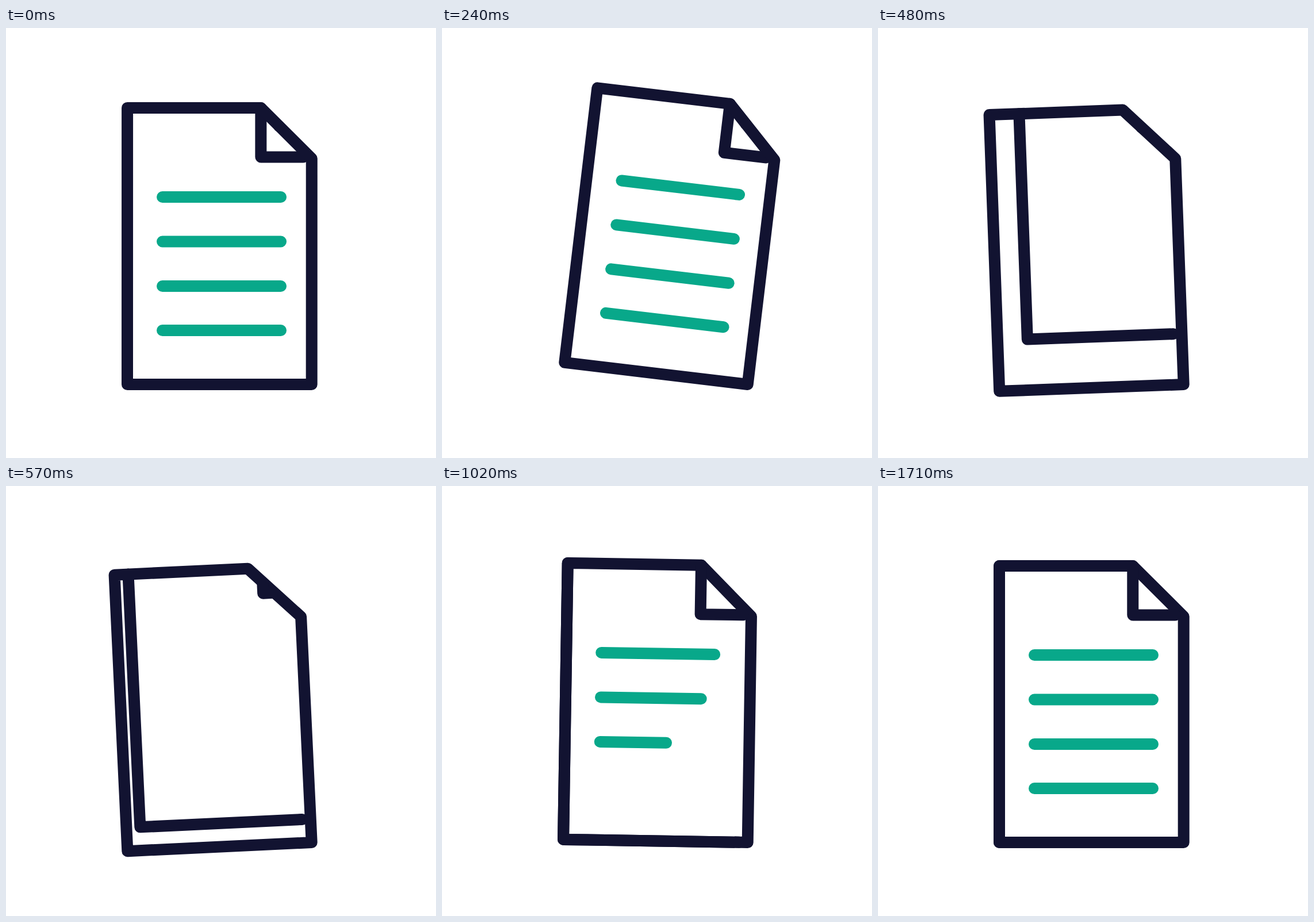
An HTML page without scripts that plays this animation: 748x748 px, repeating every 2.7 s.

```html
<!DOCTYPE html>
<html lang="en">
<head>
<meta charset="utf-8">
<title>Document page turn</title>
<style>
  html, body { margin: 0; width: 100%; height: 100%; overflow: hidden; background: #fff; }
  svg { display: block; width: 100vw; height: 100vh; }
  .ink, .text { fill: none; stroke-width: 20; stroke-linecap: round; stroke-linejoin: round; }
  .ink { stroke: #121331; }
  .text { stroke: #08a88a; }
</style>
</head>
<body>
<svg viewBox="0 0 748 748">
  <g>
    <!-- the sheet swings around its bottom right corner -->
    <animateTransform attributeName="transform" type="rotate" dur="2.7s" repeatCount="indefinite" calcMode="spline"
      values="0 532 620;7 532 620;-3 532 620;2 532 620;0 532 620;0 532 620"
      keyTimes="0;.1111;.1933;.3278;.423;1"
      keySplines=".25 .1 .3 1;.333 0 .667 1;.3 0 .667 1;.333 0 .667 1;0 0 1 1"/>

    <path class="text" d="M272 294H478M272 371.5H478M272 449H478M272 526H478"/>

    <!-- turning page: white cover, then its edge -->
    <path fill="#fff" d="M443 139V224.5H532V139z">
      <animate attributeName="d" dur="2.7s" repeatCount="indefinite" calcMode="spline"
        values="M443 139V224.5H532V139z;M443 139V224.5H532V139z;M211 139V620H532V139z;M211 139V620H532V139z"
        keyTimes="0;.1111;.313;1" keySplines="0 0 1 1;.167 .167 0 1;0 0 1 1"/>
    </path>
    <path class="ink" d="M443.3 139V224.5H517">
      <animate attributeName="d" dur="2.7s" repeatCount="indefinite" calcMode="spline"
        values="M443.3 139V224.5H517;M443.3 139V224.5H517;M211 139V620H517;M211 139V620H517"
        keyTimes="0;.1111;.313;1" keySplines="0 0 1 1;.167 .167 0 1;0 0 1 1"/>
    </path>

    <path class="ink" d="M211 139H443.3L531.7 227V620H211z"/>

    <!-- next corner fold -->
    <path class="ink" d="M475 171V171H475">
      <animate attributeName="d" dur="2.7s" repeatCount="indefinite" calcMode="spline"
        values="M475 171V171H475;M475 171V171H475;M443.3 139V224.5H517;M443.3 139V224.5H517"
        keyTimes="0;.2;.3333;1" keySplines="0 0 1 1;.167 .167 0 1;0 0 1 1"/>
    </path>

    <!-- next text, one line after another -->
    <line class="text" x1="272" y1="294" x2="272" y2="294" opacity="0">
      <animate attributeName="opacity" dur="2.7s" repeatCount="indefinite" calcMode="discrete" values="0;1" keyTimes="0;.2225"/>
      <animate attributeName="x2" dur="2.7s" repeatCount="indefinite" calcMode="spline" values="272;272;478;478"
        keyTimes="0;.2222;.463;1" keySplines="0 0 1 1;.167 .167 0 1;0 0 1 1"/>
    </line>
    <line class="text" x1="272" y1="371.5" x2="272" y2="371.5" opacity="0">
      <animate attributeName="opacity" dur="2.7s" repeatCount="indefinite" calcMode="discrete" values="0;1" keyTimes="0;.278"/>
      <animate attributeName="x2" dur="2.7s" repeatCount="indefinite" calcMode="spline" values="272;272;478;478"
        keyTimes="0;.2778;.5185;1" keySplines="0 0 1 1;.167 .167 0 1;0 0 1 1"/>
    </line>
    <line class="text" x1="272" y1="449" x2="272" y2="449" opacity="0">
      <animate attributeName="opacity" dur="2.7s" repeatCount="indefinite" calcMode="discrete" values="0;1" keyTimes="0;.3336"/>
      <animate attributeName="x2" dur="2.7s" repeatCount="indefinite" calcMode="spline" values="272;272;478;478"
        keyTimes="0;.3333;.5741;1" keySplines="0 0 1 1;.167 .167 0 1;0 0 1 1"/>
    </line>
    <line class="text" x1="272" y1="526" x2="272" y2="526" opacity="0">
      <animate attributeName="opacity" dur="2.7s" repeatCount="indefinite" calcMode="discrete" values="0;1" keyTimes="0;.3891"/>
      <animate attributeName="x2" dur="2.7s" repeatCount="indefinite" calcMode="spline" values="272;272;478;478"
        keyTimes="0;.3889;.6296;1" keySplines="0 0 1 1;.167 .167 0 1;0 0 1 1"/>
    </line>
  </g>
</svg>
</body>
</html>
```
